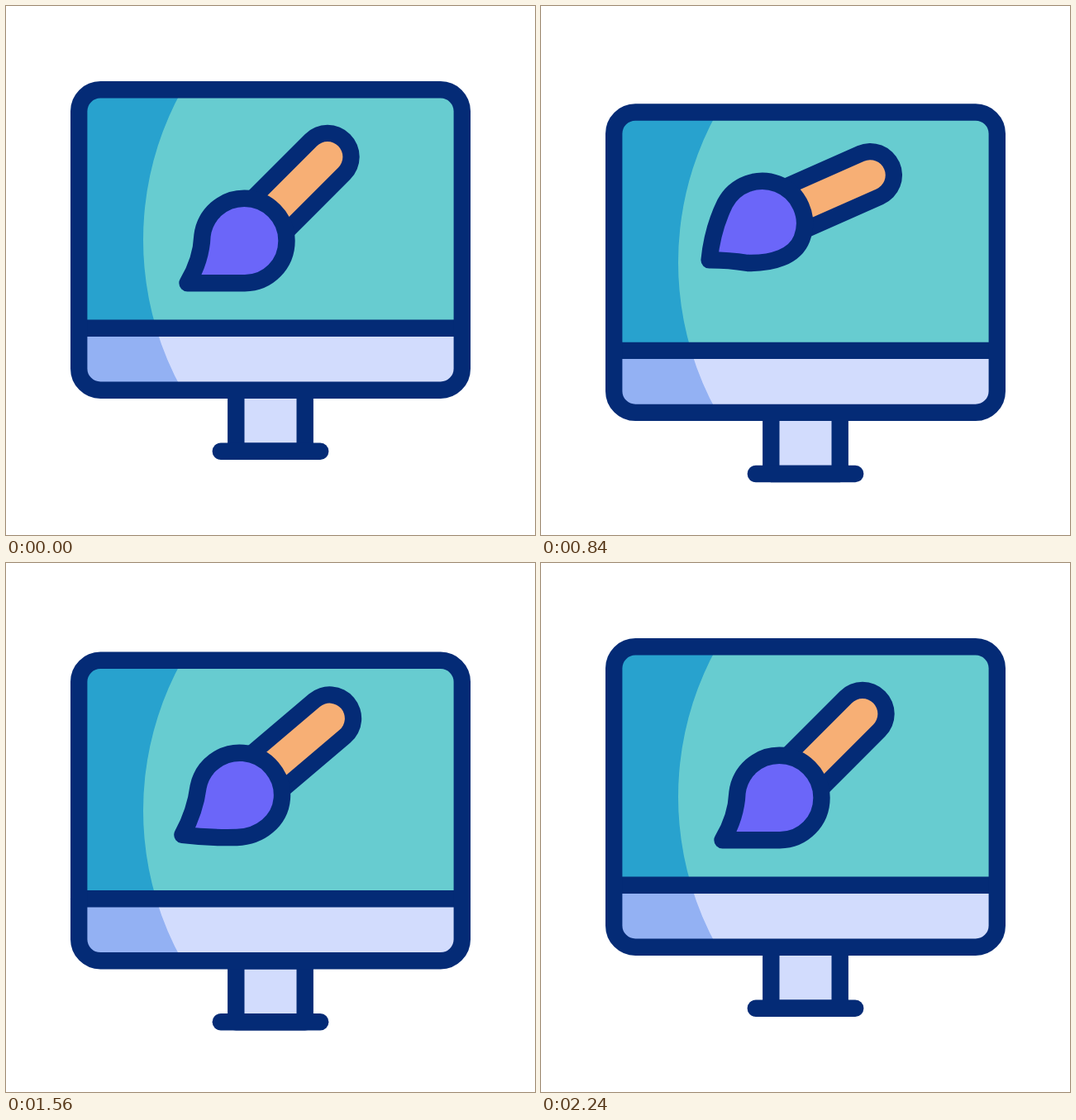
Write an HTML page that moves like this. It is 640 px wide and 640 px high and loops after 2320 ms.

```html
<!DOCTYPE html>
<html lang="en">
<head>
<meta charset="utf-8">
<title>Brush on a monitor</title>
<style>
html, body { margin: 0; width: 100%; height: 100%; overflow: hidden; background: #fff; }
svg { display: block; width: 100%; height: 100%; }
.line { fill: none; stroke: #042b76; stroke-width: 20.4; stroke-linecap: round; stroke-linejoin: round; }
</style>
</head>
<body>
<svg viewBox="0 0 640 640">
  <defs>
    <clipPath id="case"><rect x="88.2" y="101.3" width="463.6" height="363.4" rx="26"/></clipPath>
  </defs>
  <g id="monitor">
    <path class="line" d="M278.3 464.7H361.7V538.8H278.3Z" style="fill:#d2dcfd"/>
    <path class="line" d="M259.8 538.8H380.2"/>
    <g clip-path="url(#case)">
      <path fill="#67ccd0" d="M88 101H552V390H88Z"/>
      <path fill="#28a2ce" d="M88 101H213.4A373 373 0 0 0 181.7 390H88Z"/>
      <path fill="#d2dcfd" d="M88 390H552V465H88Z"/>
      <path fill="#93b1f3" d="M88 390H181.7A373 373 0 0 0 213.4 465H88Z"/>
    </g>
    <path class="line" d="M88.2 389.7H551.8"/>
    <rect class="line" x="88.2" y="101.3" width="463.6" height="363.4" rx="26"/>
  </g>
  <g id="brush">
    <g fill="none" stroke-linecap="round">
      <path stroke="#042b76" stroke-width="77.4" d="M300 271.5L389 182.5"/>
      <path stroke="#f7af75" stroke-width="36.8" d="M300 271.5L389 182.5"/>
    </g>
    <path id="head" class="line" transform="translate(288.3 284)" style="fill:#6b66f9"/>
  </g>
</svg>
<script>
const LOOP = 2320, STEP = 40;
const PIVOT = [357.6, 214.2];
const R = 51.2;

// Same curve as CSS cubic-bezier(0.5, 0, settle, 1), solved by bisection.
function ease(p, settle) {
  let lo = 0, hi = 1;
  for (let i = 0; i < 24; i++) {
    const s = (lo + hi) / 2, q = 1 - s;
    if (1.5 * q * q * s + 3 * q * s * s * settle + s ** 3 < p) lo = s; else hi = s;
  }
  return lo * lo * (3 - 2 * lo);
}

// Eases from key to key; a key is [time, value, settle].
function track(...keys) {
  return t => {
    const next = keys.findIndex(key => t < key[0]);
    if (next < 0) return keys[keys.length - 1][1];
    if (next === 0) return keys[0][1];
    const [t0, v0] = keys[next - 1], [t1, v1, settle = 0.28] = keys[next];
    return v0 + (v1 - v0) * ease((t - t0) / (t1 - t0), settle);
  };
}

const monitorY = track([80, 0], [1160, 30, 0.34], [2240, 0, 0.2]);
const brushY = track([80, 0], [1040, 9], [2080, 0]);
const brushTurn = track([80, 0], [560, 13], [1040, -29], [1900, 0]);
const tipSwing = track([120, 0], [760, 25], [1040, -6], [1960, 5], [2240, 0]);
const squash = track([360, 0], [640, 8], [1040, 8], [2080, 0]);

// Curve from a to b, bowed outward by the given distance.
function bowed([ax, ay], [bx, by], bow) {
  const dx = bx - ax, dy = by - ay, k = bow / Math.hypot(dx, dy);
  const at = f => `${ax + dx * f + dy * k} ${ay + dy * f - dx * k}`;
  return `C${at(0.34)} ${at(0.69)} ${bx} ${by}`;
}

// Round head whose tip trails behind the turning handle.
function headPath(swing, press) {
  const angle = (143.3 - swing) * Math.PI / 180;
  const reach = 85.8 - 0.3 * Math.abs(swing) - 0.25 * press;
  const tip = [reach * Math.cos(angle), reach * Math.sin(angle)];
  const bottom = [0.7, R], left = [-50.85, -6];
  return `M${left}A${R} ${R} 0 0 1 0 ${-R}A${R} ${R} 0 0 1 ${R} 0`
    + `C${R} ${28.3 - 0.6 * press} 29 ${R - 1.3 * press} ${bottom}`
    + bowed(bottom, tip, press * (0.75 - 0.047 * swing))
    + bowed(tip, left, 0.48 * swing - 5) + 'Z';
}

const [monitor, brush, head] = ['monitor', 'brush', 'head'].map(id => document.getElementById(id));

function draw(t) {
  monitor.setAttribute('transform', `translate(0 ${monitorY(t)})`);
  brush.setAttribute('transform', `translate(0 ${brushY(t)}) rotate(${-brushTurn(t)} ${PIVOT})`);
  head.setAttribute('d', headPath(tipSwing(t), squash(t)));
}

const start = performance.now();
function tick() {
  const t = (performance.now() - start) % LOOP;
  draw(Math.floor(t / STEP) * STEP);
  requestAnimationFrame(tick);
}
tick();
</script>
</body>
</html>
```
